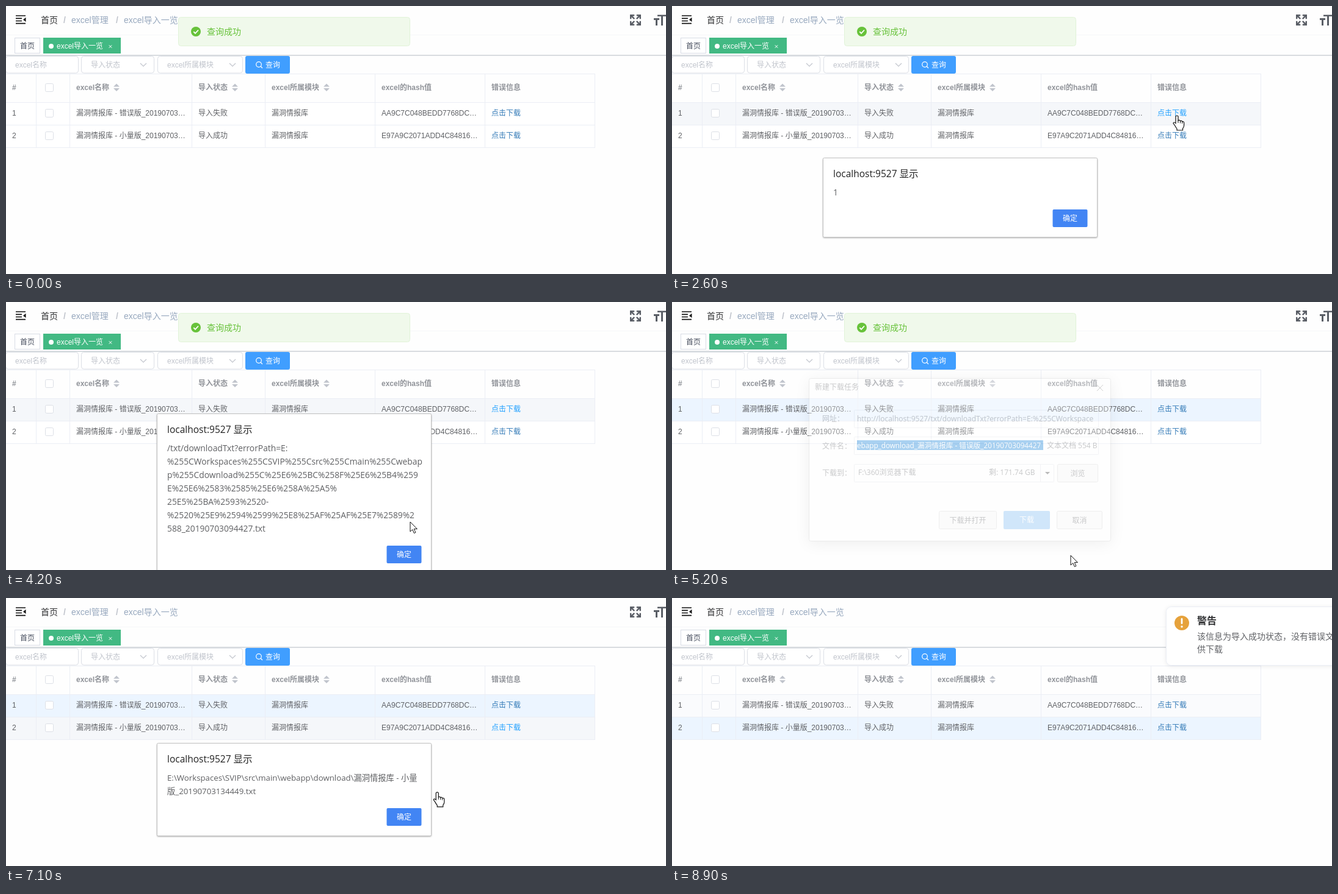
These frames come from a looping animation (1081 px wide and 440 px high, 9500 ms). An HTML page:

```html
<!DOCTYPE html>
<html lang="zh">
<head>
<meta charset="utf-8">
<style>
  html, body { margin: 0; width: 100%; height: 100%; overflow: hidden; background: #fefefe; }
  svg { display: block; width: 1081px; height: 440px; }
  text { font: 12px "Liberation Sans", "Noto Sans CJK SC", "Noto Sans CJK", sans-serif; fill: #606266; white-space: pre; }
  .crumb { font-size: 14px; fill: #97a8be; }
  .sep { font-size: 14px; font-weight: bold; fill: #c0c4cc; }
  .head { font-weight: bold; fill: #909399; }
  .hint { fill: #c0c4cc; }
  .white { fill: #fff; }
  .link { fill: #337ab7; }
  .link.on { fill: #20a0ff; }
  .native text { font-family: "Open Sans", "Noto Sans CJK SC", "Noto Sans CJK", sans-serif; }
  .native .title { font-size: 15.5px; fill: #222; }
  .native .body { fill: #5f6063; }
  .native .white { fill: #fff; }
  .native .name { font-size: 11.7px; }
  .ok { fill: #4285f4; }
  .ok.on { fill: #5090f0; }
  .mid { text-anchor: middle; }
  .field { fill: #fff; stroke: #dcdfe6; }
  .shade { filter: drop-shadow(0 1px 1px rgba(0, 0, 0, .3)); }
  .soft { filter: drop-shadow(0 4px 12px rgba(0, 0, 0, .18)); }
  .faint { filter: drop-shadow(0 1px 3px rgba(0, 0, 0, .08)); }
</style>
</head>
<body>
<svg id="stage" viewBox="0 0 1081 440"></svg>
<script>
const LOOP = 9500, STEP = 100;

// Markup helpers
const text = (x, y, s, cls = '', extra = '') => `<text x="${x}" y="${y}" class="${cls}" ${extra}>${s}</text>`;
const rect = (x, y, w, h, fill, r = 0, extra = '') =>
  `<rect x="${x}" y="${y}" width="${w}" height="${h}" rx="${r}" fill="${fill}" ${extra}/>`;
const box = (x, y, w, h, r = 4) => `<rect class="field" x="${x}" y="${y}" width="${w}" height="${h}" rx="${r}"/>`;
const path = (d, fill, extra = '') => `<path d="${d}" fill="${fill}" ${extra}/>`;
const line = (d, stroke, width = 1) => path(d, 'none', `stroke="${stroke}" stroke-width="${width}"`);
const group = (id, body, cls = '') => `<g id="${id}" class="${cls}">${body}</g>`;

function navbar() {
  const arrow = 'M3 3L8 8M2 8V2H8';
  const corners = [0, 90, 180, 270].map(a =>
    `<g transform="translate(1031 23) rotate(${a}) translate(-9.8 -9.8)">${line(arrow, '#5a5e66', 2.4)}</g>`).join('');
  return line('M16 16H32M16 20.3H26M16 24.5H26M16 28.6H32', '#111', 1.7) +
    path('M32.5 18.8V26L28 22.4Z', '#111') +
    text(57, 28, '首页', 'crumb', 'style="fill:#303133"') + text(94, 28, '/', 'sep') +
    text(107, 28, 'excel管理', 'crumb') + text(180, 28, '/', 'sep') +
    text(193, 28, 'excel导入一览', 'crumb') + corners +
    path('M1067 14.5H1083V17H1076V32H1073V17H1067ZM1061 20H1070V23H1067V32H1064V23H1061Z', '#5a5e66') +
    line('M0 47.5H1081', '#f6f7f9');
}

function tags() {
  return rect(14.5, 52.5, 41, 25, '#fff', 0, 'stroke="#d8dce5"') +
    text(23, 70, '首页', '', 'style="fill:#495060"') +
    rect(61, 52, 127, 26, '#42b983') + '<circle cx="74" cy="66" r="4" fill="#fff"/>' +
    text(83, 70, 'excel导入一览', 'white') + line('M168.7 64.2L173.3 68.8M173.3 64.2L168.7 68.8', '#fff');
}

function filters() {
  const chevron = x => line(`M${x - 5} 94L${x} 99L${x + 5} 94`, '#c0c4cc', 1.1);
  return box(-.5, 82.5, 119, 27.5) + box(123.5, 82.5, 119, 27.5) + box(248.5, 82.5, 139, 27.5) +
    text(15, 101, 'excel名称', 'hint') + text(139, 101, '导入状态', 'hint') + text(264, 101, 'excel所属模块', 'hint') +
    chevron(225) + chevron(371) + line('M0 81H1081', '#d8dce0', 2) +
    rect(392, 82, 73, 29, '#409eff', 3, 'id="query"') +
    '<circle cx="414" cy="96" r="4.3" fill="none" stroke="#fff" stroke-width="1.2"/>' +
    line('M417 99L420 102', '#fff', 1.2) +
    text(425, 101, '查询', 'white', 'font-weight="500"');
}

function table() {
  const cols = [10, null, 115, 315, 435, 615, 795];
  const heads = ['#', , 'excel名称', '导入状态', 'excel所属模块', 'excel的hash值', '错误信息'];
  const rows = [
    ['1', , '漏洞情报库 - 错误版_20190703…', '导入失败', '漏洞情报库', 'AA9C7C048BEDD7768DC…', '点击下载'],
    ['2', , '漏洞情报库 - 小量版_20190703…', '导入成功', '漏洞情报库', 'E97A9C2071ADD4C84816…', '点击下载']];
  const cells = (list, y, cls) => list.map((s, i) =>
    text(cols[i], y, s, cls || (i === 6 ? 'link' : ''))).join('') + box(64.5, y - 10.5, 13, 13, 2);
  const sort = x => path(`M${x - 5} 132.5L${x} 127.5L${x + 5} 132.5ZM${x - 5} 135L${x} 140L${x + 5} 135Z`, '#c0c4cc');
  const grid = [49.5, 104.5, 304.5, 424.5, 604.5, 784.5, 964.5].map(x => `M${x} 111V233`).join('') +
    [111.5, 158.5, 195.5, 232.5].map(y => `M0 ${y}H965`).join('');
  return rect(0, 159, 965, 37, '#fff', 0, 'id="row0"') + rect(0, 196, 965, 37, '#fff', 0, 'id="row1"') +
    line(grid, '#ebeef5') + cells(heads, 138, 'head') + [181, 375, 525].map(sort).join('') +
    cells(rows[0], 180) + cells(rows[1], 217) +
    rect(0, 112, 965, 121, '#fff', 0, 'id="mask"');
}

const toast = id => group(id, rect(282.5, 18.5, 379, 47, '#f0f9eb', 4, 'stroke="#e1f3d8"') +
  '<circle cx="311" cy="42" r="8" fill="#67c23a"/>' + line('M307.3 42.2L310 44.9L315 39.5', '#fff', 1.8) +
  text(329, 47, '查询成功', '', 'style="font-size:14px;fill:#67c23a"'));

const tooltip = () => group('tip', rect(566, 113, 259, 34, '#303133', 4) + path('M691 147H703L697 153Z', '#303133') +
  text(695.5, 134, 'AA9C7C048BEDD7768DC52B0E91F3A64D', 'white mid'));

function alertBox(id, top, size, lines) {
  const h = 108 + 22 * lines.length;
  return group(id, `<g class="shade">${rect(247.5, top + .5, 449, h, '#fff', 2, 'stroke="#c2c2c2"')}</g>` +
    text(264, top + 32, 'localhost:9527 显示', 'title') +
    lines.map((s, i) => text(264, top + 62 + 22 * i, s, 'body', `style="font-size:${size}px"`)).join('') +
    rect(623.5, top + h - 45, 57, 29, '', 2, 'class="ok"') + text(652, top + h - 26, '确定', 'white mid'), 'native');
}

function download() {
  const button = (x, y, w, s) => rect(x, y, w, 29, '#f7f7f7', 2, 'stroke="#d0d0d0"') + text(x + w / 2, y + 19, s, 'mid');
  return group('download', `<g class="soft">${rect(224.5, 125.5, 494, 267, '#fff', 3, 'stroke="#c8c8c8"')}</g>` +
    text(234, 144, '新建下载任务') + line('M696 136L706 146M706 136L696 146', '#777') +
    text(246, 196, '网址：') + text(246, 241, '文件名：') + text(246, 285, '下载到：') +
    box(298.5, 177.5, 400, 29, 1) + box(298.5, 221.5, 400, 29, 1) + box(298.5, 266.5, 327, 29, 1) +
    text(303, 196, 'http://localhost:9527/txt/downloadTxt?errorPath=E:%255CWorkspace') +
    rect(303, 227, 305, 16, '#0078d7') +
    text(303, 240, 'ebapp_download_漏洞情报库 - 错误版_20190703094427', 'white name') +
    text(614, 240, '文本文档 554 B') + text(305, 284, 'F:\\360浏览器下载') + text(519, 284, '剩: 171.74 GB') +
    line('M603.5 267V295', '#dcdfe6') + path('M611 279H619L615 283Z', '#333') +
    button(631.5, 266.5, 66, '浏览') + button(437.5, 343.5, 94, '下载并打开') + button(630.5, 343.5, 74, '取消') +
    rect(543, 343, 76, 30, '#78b9f4', 2) + text(581, 362, '下载', 'white mid'), 'native');
}

const notice = () => group('notice', `<g class="faint">${rect(809.5, 14.5, 330, 96, '#fff', 8, 'stroke="#ebeef5"')}</g>` +
  '<circle cx="835" cy="41" r="12" fill="#e6a23c"/>' + rect(833.6, 33, 2.8, 10, '#fff', 1.4) +
  '<circle cx="835" cy="47" r="1.7" fill="#fff"/>' +
  text(860, 43, '警告', '', 'style="font-size:16px;font-weight:bold;fill:#303133"') +
  text(860, 68, '该信息为导入成功状态，没有错误文件', '', 'style="font-size:14px"') +
  text(860, 89, '供下载', '', 'style="font-size:14px"'));

const pointers = () =>
  group('arrow', path('M0 0V16L3.8 12.6L6.4 18.6L8.9 17.5L6.3 11.6H11.4Z', '#fff', 'stroke="#111"')) +
  group('hand', path('M-2 2Q-2 0 0 0Q2 0 2 2V8Q4 6.5 5.5 8.8Q7.5 7.5 8.6 9.8Q11.6 9 11.6 12V16Q11.6 19 9.5 21V24H0V21.5Q-2 19-3.5 16L-6 12.5Q-5.5 9.5-2 12.5Z',
    '#fff', 'stroke="#111" stroke-width="1.2"') + line('M2 8V12M5.5 9V12.5M8.6 10V13', '#111'));

const longPath = ['/txt/downloadTxt?errorPath=E:', '%255CWorkspaces%255CSVIP%255Csrc%255Cmain%255Cwebap',
  'p%255Cdownload%255C%25E6%25BC%258F%25E6%25B4%259', 'E%25E6%2583%2585%25E6%258A%25A5%', '25E5%25BA%2593%2520-',
  '%2520%25E9%2594%2599%25E8%25AF%25AF%25E7%2589%2', '588_20190703094427.txt'];

const stage = document.getElementById('stage');
stage.innerHTML = navbar() + tags() + filters() + table() + tooltip() + toast('toastA') + toast('toastB') +
  alertBox('alertA', 249, 13.8, ['1']) + alertBox('alertB', 183, 13.8, longPath) +
  alertBox('alertC', 238, 13.25, ['E:\\Workspaces\\SVIP\\src\\main\\webapp\\download\\漏洞情报库 - 小量', '版_20190703134449.txt']) +
  download() + notice() + pointers();

const el = {};
stage.querySelectorAll('[id]').forEach(e => el[e.id] = e);
const links = stage.querySelectorAll('.link');
const okButtons = stage.querySelectorAll('.ok');

// Timeline
const route = [
  [200, 1050, 64], [400, 902, 109], [700, 530, 118], [900, 440, 100], [1200, 437, 100], [1500, 620, 162],
  [1700, 697, 172], [1900, 827, 180], [2800, 827, 180], [3000, 779, 242], [3200, 706, 318], [3400, 655, 345],
  [3600, 655, 345], [3800, 662, 361], [4300, 662, 361], [4600, 653, 416], [5300, 653, 416], [5600, 656, 385],
  [5900, 664, 355], [6000, 670, 352], [6200, 820, 258], [6300, 836, 215], [6600, 836, 215], [6700, 768, 272],
  [7400, 660, 354], [7900, 660, 354], [8200, 820, 235], [8500, 973, 162], [8700, 1028, 145], [8900, 1060, 138]];
const within = (t, a, b) => t >= a && t < b;
const ramp = (t, a, b) => Math.min(1, Math.max(0, (t - a) / (b - a)));
const fade = (t, a, b, c, d) => ramp(t, a, b) * (1 - ramp(t, c, d));
const ease = u => 1 - (1 - u) ** 2;

function show(e, alpha, dx = 0, dy = 0) {
  e.style.display = alpha > 0 ? '' : 'none';
  e.setAttribute('opacity', alpha);
  e.setAttribute('transform', `translate(${dx} ${dy})`);
}

function pointer(t) {
  const visible = within(t, 200, 8900);
  let x = 0, y = 0;
  if (visible) {
    const i = route.findIndex(k => k[0] > t);
    const [t0, x0, y0] = route[i - 1], [t1, x1, y1] = route[i], u = (t - t0) / (t1 - t0);
    x = x0 + (x1 - x0) * u;
    y = y0 + (y1 - y0) * u;
  }
  const hand = within(t, 800, 1300) || within(t, 1800, 3400) || within(t, 6300, 7200);
  show(el.hand, +(visible && hand), x, y);
  show(el.arrow, +(visible && !hand), x, y);
}

function popup(e, t, a, b, c, d) {
  show(e, fade(t, a, b, c, d), 0, -9 * (1 - ease(ramp(t, a, b))));
}

function draw(t) {
  const outA = ramp(t, 700, 1000), inB = ramp(t, 1100, 1500), outB = ramp(t, 6300, 6600);
  show(el.toastA, 1 - outA, 0, -48 * ease(outA));
  show(el.toastB, inB * (1 - outB), 0, -48 * (1 - ease(inB) + ease(outB)));
  show(el.mask, .7 * fade(t, 900, 1100, 1100, 1400));
  show(el.tip, fade(t, 1500, 1600, 1800, 2000));
  popup(el.alertA, t, 2200, 2500, 3400, 3700);
  popup(el.alertB, t, 3700, 4000, 4800, 5100);
  popup(el.alertC, t, 6700, 7000, 7800, 8100);
  show(el.download, fade(t, 5100, 5400, 5900, 6200));
  const slide = ramp(t, 7900, 8300);
  show(el.notice, +(slide > 0), 272 * (1 - ease(slide)));

  el.query.setAttribute('fill', within(t, 900, 2300) ? '#66b1ff' : '#409eff');
  el.row0.setAttribute('fill', within(t, 1500, 4900) ? '#f5f7fa' : within(t, 4900, 8000) ? '#ecf5ff' : t >= 8300 ? '#fafbfd' : '#fff');
  el.row1.setAttribute('fill', t >= 8000 ? '#ecf5ff' : t >= 6200 ? '#f5f7fa' : '#fff');
  links[0].classList.toggle('on', within(t, 1800, 4900));
  links[1].classList.toggle('on', within(t, 6300, 7500));
  const pressing = within(t, 3400, 3700) || within(t, 4600, 5100) || within(t, 7400, 8100);
  okButtons.forEach(b => b.classList.toggle('on', pressing));
  pointer(t);
}

const start = performance.now();
function tick() {
  const t = (performance.now() - start) % LOOP;
  draw(Math.floor(t / STEP) * STEP);
  requestAnimationFrame(tick);
}
tick();
</script>
</body>
</html>
```
